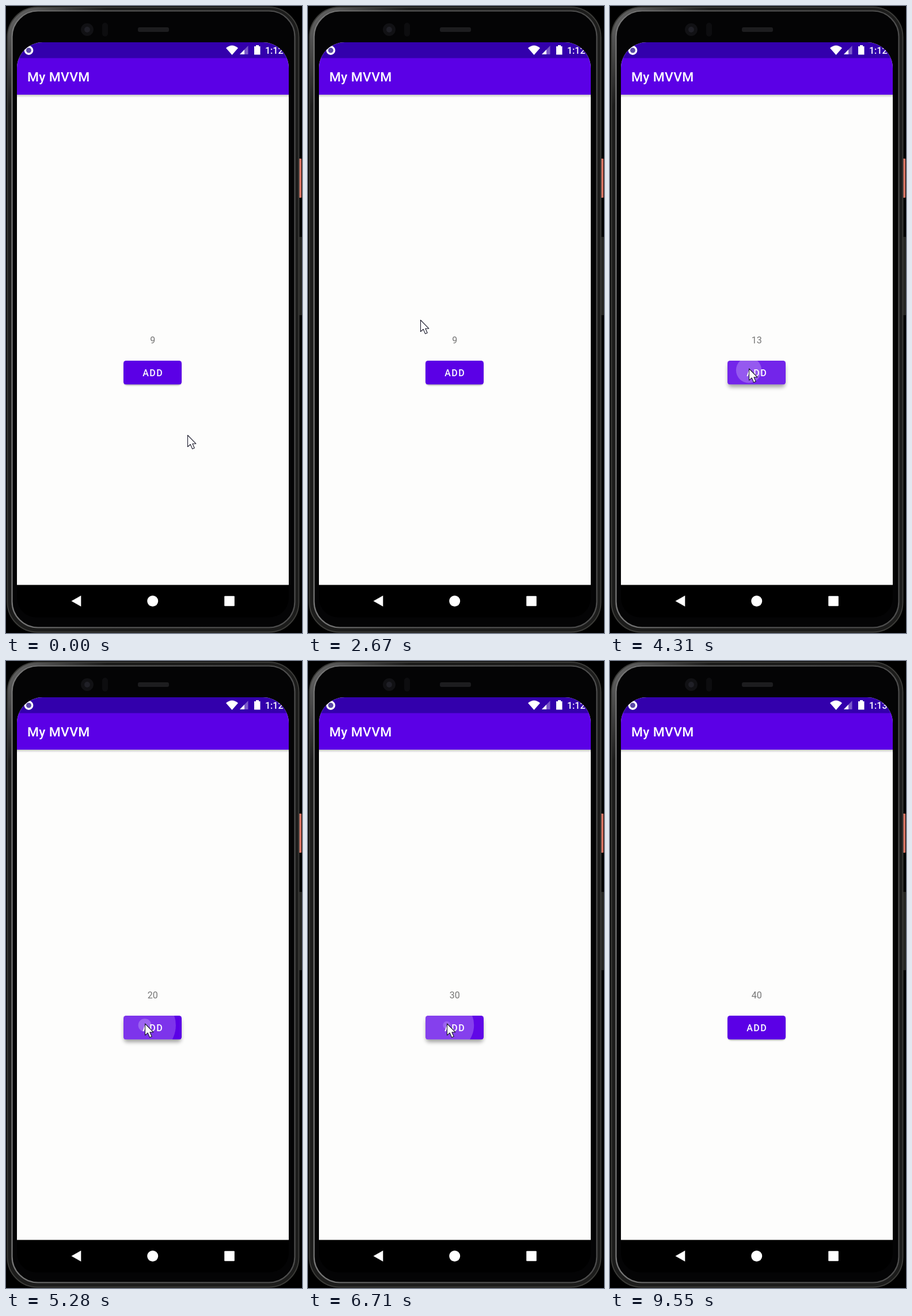
Recreate the animation shown at these times as an HTML page. Size 514 by 1089 pixels, loop 9.84 s.

```html
<!DOCTYPE html>
<html lang="en">
<head>
<meta charset="utf-8">
<title>Counter app</title>
<style>
  html, body { margin: 0; width: 100%; height: 100%; overflow: hidden; background: #000; }
  svg { display: block; width: 100%; height: 100%; }
  text { font-family: Roboto, sans-serif; font-size: 16px; fill: #fff; }
  .medium { font-weight: 500; }
</style>
</head>
<body>
<svg viewBox="0 0 514 1089">
  <defs>
    <clipPath id="screen"><path d="M19 1005.5V108A45 45 0 0 1 64 63H446A45 45 0 0 1 491 108V1005.5Z"/></clipPath>
    <clipPath id="face"><rect x="204" y="616" width="101" height="41.5" rx="4.5"/></clipPath>
    <filter id="soft" x="-30%" y="-60%" width="160%" height="220%"><feGaussianBlur id="blur" stdDeviation="2"/></filter>
    <linearGradient id="barShade" x2="0" y2="1">
      <stop stop-opacity=".22"/><stop offset="1" stop-opacity="0"/>
    </linearGradient>
    <linearGradient id="band" gradientUnits="userSpaceOnUse" x2="90" y2="90">
      <stop offset=".1" stop-color="#666"/><stop offset="1" stop-color="#1c1c1b"/>
    </linearGradient>
    <linearGradient id="rim">
      <stop stop-color="#777"/><stop offset=".3" stop-color="#5c5c5c"/><stop offset="1" stop-color="#4c4c4c"/>
    </linearGradient>
  </defs>

  <!-- phone body -->
  <rect width="514" height="1089"/>
  <rect x="508" y="265" width="5" height="68" rx="1" fill="#dc7665"/>
  <rect x="509" y="401" width="5" height="136" rx="1" fill="#252522"/>
  <rect x="2.5" y="2" width="506" height="1085.5" rx="52" fill="url(#band)" stroke="#3b3b38" stroke-width="2"/>
  <rect x="10.5" y="8.5" width="491" height="1071" rx="45" fill="#040405" stroke="url(#rim)" stroke-width="2.2"/>
  <circle cx="141" cy="41" r="11" fill="#111114"/>
  <circle cx="141" cy="41" r="5" fill="#202027"/>
  <rect x="167" y="29" width="10" height="24" rx="5" fill="#0d0d0f"/>
  <rect x="229" y="37" width="54" height="8" rx="3" fill="#1d1d1f"/>
  <path d="M19 1005H491V1030A34 34 0 0 1 457 1062H53A34 34 0 0 1 19 1030Z"/>

  <!-- app screen -->
  <g clip-path="url(#screen)">
    <rect x="19" y="63" width="472" height="943" fill="#fdfdfc"/>
    <rect x="19" y="154" width="472" height="5" fill="url(#barShade)"/>
    <rect x="19" y="90" width="472" height="64" fill="#5b00e6"/>
    <rect x="19" y="63" width="472" height="27.5" fill="#3300ac"/>
    <circle cx="39.5" cy="77" r="6.2" fill="#5b49a8" stroke="#fff" stroke-width="3.4"/>
    <g fill="#fff">
      <path d="M382 73Q392.5 64 403 73L392.5 85Z"/>
      <path d="M406 84L420.5 69V84Z" fill-opacity=".35"/>
      <path d="M406 84L414 75.8V84Z"/>
      <path d="M431 70H434V68H439V70H441.5V84.5H431Z"/>
    </g>
    <text id="clock" class="medium" x="450" y="83">1:12</text>
    <text class="medium" x="37" y="131" letter-spacing=".29" style="font-size:22.9px">My MVVM</text>
  </g>
  <text id="count" x="254.8" y="586.3" text-anchor="middle" style="fill:#757575"></text>

  <!-- button -->
  <rect id="shadow" x="205" width="99" height="40" rx="5" filter="url(#soft)"/>
  <g clip-path="url(#face)">
    <rect x="204" y="616" width="101" height="41.5" fill="#5b00e6"/>
    <g id="ripples" fill="#fff"></g>
  </g>
  <text class="medium" x="255.2" y="643" text-anchor="middle" letter-spacing="1.43">ADD</text>

  <!-- navigation bar -->
  <g fill="#fff">
    <path d="M113.5 1033.5L130.3 1024V1043Z"/>
    <circle cx="254.7" cy="1033.5" r="9.5"/>
    <rect x="379.2" y="1024.7" width="17.6" height="17.6" rx="1"/>
  </g>

  <path id="cursor" d="M.5 .5V20.5L5.2 16.4L8.6 24.2L12.2 22.7L8.9 15.2H14.8Z"
        fill="#fff" stroke="#1b1b2c" stroke-width="1.1" stroke-linejoin="round"/>
</svg>
<script>
const LOOP = 9840, START = 9, HOLD = 100;
const $ = id => document.getElementById(id);
const clamp = v => Math.max(0, Math.min(1, v));
const mix = (a, b, k) => a + (b - a) * k;

// Pointer stops: time, x, y
const path = [
  [0, 315, 745], [40, 315, 745], [770, 223, 598], [1440, 223, 598], [1470, 225, 596],
  [1770, 225, 596], [2240, 336, 480], [2440, 336, 480], [2510, 194, 538],
  [2640, 194, 538], [2670, 195, 545], [2960, 241, 629.5], [8300, 241, 629.5], [8800, 522, 570]
];

// The tapping is slow at first, then settles into a steady rhythm.
const taps = [3040, 3400, 3750, 4073];
function tapRun(from, to, n) {
  for (let i = 0; i < n; i++) taps.push(mix(from, to, i / n));
}
tapRun(4218, 5230, 7);
tapRun(5230, 6680, 10);
tapRun(6680, 7618, 7);
tapRun(7618, 8020, 3);

function pointer(t) {
  const i = path.findIndex(p => p[0] > t);
  if (i < 0) return path[path.length - 1].slice(1);
  const [t0, x0, y0] = path[i - 1], [t1, x1, y1] = path[i];
  const k = (t - t0) / (t1 - t0), e = k * k * (3 - 2 * k);
  return [mix(x0, x1, e), mix(y0, y1, e)];
}

function ripple(age) {
  const k = clamp(age / 240), radius = 70 * k * (.7 + .3 * k);
  const alpha = .24 * clamp(age / 40) * clamp((340 - age) / 170);
  return `<circle cx="241" cy="632.5" r="${radius}" opacity="${alpha}"/>`;
}

function draw(t) {
  const ages = taps.map(p => t - p);
  const lift = Math.max(...ages.map(a => clamp(a / 100) * clamp((400 - a) / 150)));
  $("count").textContent = START + ages.filter(a => a >= HOLD).length;
  $("clock").textContent = t < 9350 ? "1:12" : "1:13";
  $("ripples").innerHTML = ages.filter(a => a > 0 && a < 340).map(ripple).join("");
  $("shadow").setAttribute("y", mix(618.5, 622, lift));
  $("shadow").setAttribute("opacity", mix(.38, .36, lift));
  $("blur").setAttribute("stdDeviation", mix(1.5, 3.6, lift));
  $("cursor").setAttribute("transform", `translate(${pointer(t)})`);
}

function frame(now) {
  draw(now % LOOP);
  requestAnimationFrame(frame);
}
draw(0);
requestAnimationFrame(frame);
</script>
</body>
</html>
```
